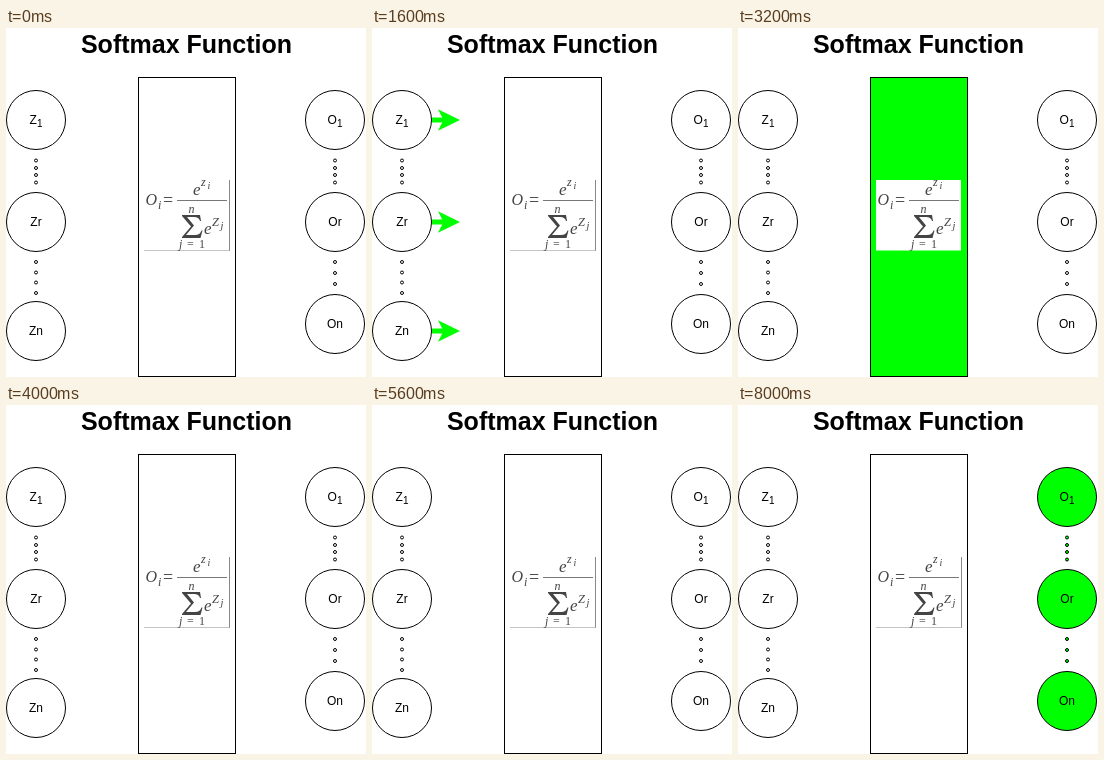
Animation of 360x349 px, one loop 8800 ms. Source, as an HTML page:

```html
<!DOCTYPE html>
<html lang="en">
<head>
<meta charset="utf-8">
<title>Softmax Function</title>
<style>
html, body { margin: 0; width: 100%; height: 100%; overflow: hidden; background: #fff; }
svg { display: block; width: 360px; height: 349px; font-family: "Liberation Sans", Arial, sans-serif; }
.title { font-weight: bold; font-size: 25px; text-anchor: middle; }
.label { font-size: 12px; text-anchor: middle; }
.low { font-size: 10px; }
.node { fill: #fff; stroke: #000; }
.formula { font: italic 16px "Liberation Serif", Times, serif; fill: #444; }
.arrow { fill: #0f0; }

/* eleven steps of 800 ms, every change is hard */
.node, .show, .slide { animation: 8.8s step-end infinite; }
.input .node { animation-name: input; }
.output .node { animation-name: output; }
.box { animation-name: box !important; }
.edge { animation-name: edge; }
.in { animation-name: in; }
.out { animation-name: out; }
.in .slide { animation-name: in-tip; }
.out .slide { animation-name: out-tip; }
@keyframes input { 0%, 18.1818% { fill: #fff; } 9.0909% { fill: #0f0; } }
@keyframes output { 0% { fill: #fff; } 90.9091%, 100% { fill: #0f0; } }
@keyframes box { 0%, 45.4545%, 63.6364%, 100% { fill: #fff; } 36.3636%, 54.5455% { fill: #0f0; } }
@keyframes edge { 0%, 45.4545%, 63.6364%, 100% { opacity: 1; } 36.3636%, 54.5455% { opacity: 0; } }
@keyframes in { 0%, 36.3636%, 100% { visibility: hidden; } 18.1818% { visibility: visible; } }
@keyframes out { 0%, 90.9091%, 100% { visibility: hidden; } 72.7273% { visibility: visible; } }
@keyframes in-tip { 0% { transform: translateX(-45px); } 27.2727%, 100% { transform: none; } }
@keyframes out-tip { 0% { transform: translateX(-41px); } 81.8182%, 100% { transform: none; } }
</style>
</head>
<body>
<svg viewBox="0 0 360 349">
  <defs>
    <path id="head" d="M0 0 L-22 -10.8 L-16.5 0 L-22 10.8 Z"/>
    <clipPath id="inClip"><rect x="60" y="60" width="74" height="270"/></clipPath>
    <clipPath id="outClip"><rect x="229" y="60" width="73" height="270"/></clipPath>
  </defs>
  <text class="title" x="180.5" y="25">Softmax Function</text>
  <rect class="node box" x="132.5" y="49.5" width="97" height="299"/>

  <g class="formula">
    <path class="show edge" d="M138 222.5 H223.5 V152" fill="none" stroke="#888"/>
    <rect x="138" y="152" width="85" height="70.5" fill="#fff"/>
    <text x="139.5" y="177">O</text>
    <text x="152" y="181" font-size="12">i</text>
    <text x="157" y="178" font-style="normal" font-size="18">=</text>
    <text x="187" y="167" font-size="17">e</text>
    <text x="195" y="158" font-size="12">z</text>
    <text x="201.5" y="161" font-size="10">i</text>
    <path d="M171 172.5 H221" stroke="#777"/>
    <text x="182.5" y="185" font-size="12">n</text>
    <path d="M176 187 H194 L195 193 H194 Q193 189 188 189 H181 L188 197.5 L180 207 H189 Q194 207 195.5 202.5 H196.5 L194.5 210 H176 V209 L185 198.5 L176 188 Z"/>
    <text x="173" y="220" font-size="12">j<tspan x="181" font-style="normal">=</tspan><tspan x="193" font-style="normal">1</tspan></text>
    <text x="198" y="206" font-size="17">e</text>
    <text x="206" y="198" font-size="12.5">Z</text>
    <text x="214.5" y="201" font-size="10.5">j</text>
  </g>

  <g id="input" class="input"></g>
  <g id="output" class="output"></g>
  <g id="in" class="arrow show in" clip-path="url(#inClip)"></g>
  <g id="out" class="arrow show out" clip-path="url(#outClip)"></g>
</svg>
<script>
const byId = id => document.getElementById(id);

function column(id, letter, x, rows, dots) {
  const nodes = rows.map((y, i) => {
    const sub = i ? "rn"[i - 1] : '<tspan class="low" dy="3">1</tspan>';
    return `<circle class="node" cx="${x}" cy="${y}" r="29.5"/>
      <text class="label" x="${x}" y="${y + 4}">${letter}${sub}</text>`;
  });
  const small = dots.map(y => `<circle class="node" cx="${x}" cy="${y}" r="1.5"/>`);
  byId(id).innerHTML = nodes.concat(small).join("");
}

function arrows(id, start, tip) {
  byId(id).innerHTML = [92, 194, 303].map(y => `<g class="slide">
    <rect x="${start - 50}" y="${y - 2.5}" width="${tip - start + 34}" height="5"/>
    <use href="#head" x="${tip}" y="${y}"/></g>`).join("");
}

const upper = [132.5, 143.5, 154.5].flatMap((y, i) => i === 1 ? [140, 147] : [y]);
column("input", "Z", 30, [92, 194, 303], [...upper, 234, 244.5, 254.5, 265]);
column("output", "O", 329, [92, 194, 296], [...upper, 234, 245, 256]);
arrows("in", 60, 133);
arrows("out", 229, 301);
</script>
</body>
</html>
```
